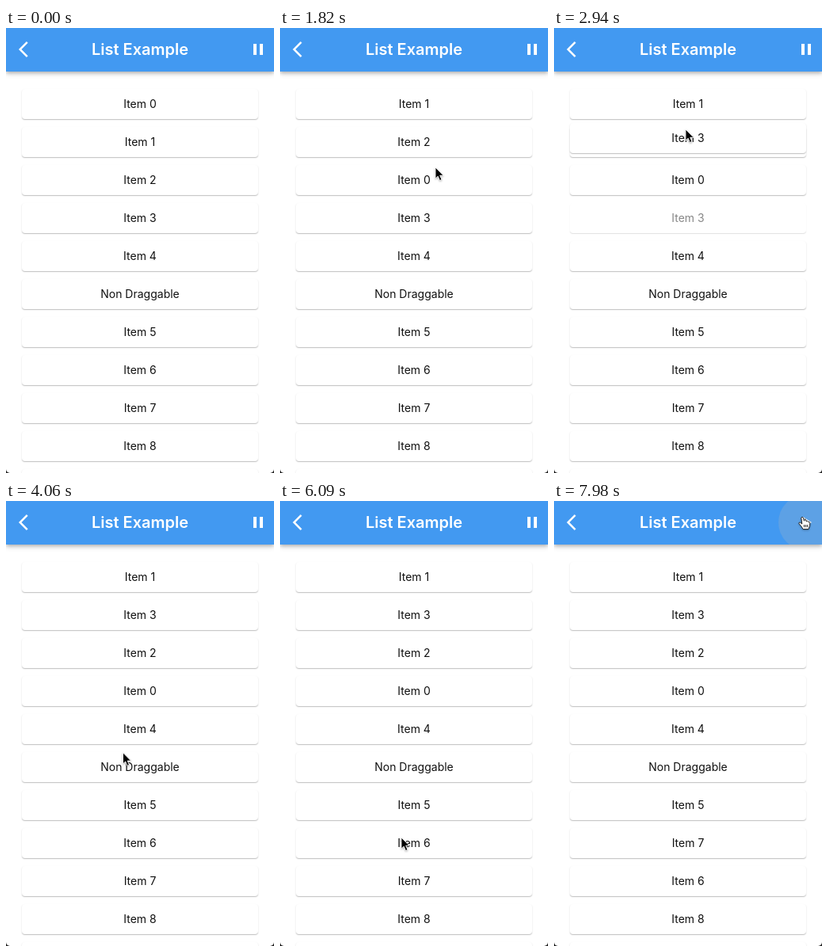
Write an HTML page that moves like this. It is 338 px wide and 562 px high and loops after 8000 ms.

```html
<!DOCTYPE html>
<html lang="en">
<head>
<meta charset="utf-8">
<title>List Example</title>
<style>
  html, body { margin: 0; width: 100%; height: 100%; overflow: hidden; background: #222; }
  #app {
    position: absolute; inset: 0; overflow: hidden; background: #fff;
    border-radius: 0 0 5px 5px; font-family: Inter, Roboto, sans-serif;
  }
  header {
    position: absolute; left: 0; right: 0; top: 0; height: 55px; overflow: hidden;
    background: #4299f1; color: #fff; text-align: center;
    font: 600 20px/54px Inter, Roboto, sans-serif;
  }
  .shade {
    position: absolute; left: 0; right: 0; top: 0; height: 55px;
    box-shadow: 0 2px 4px rgba(0,0,0,.2), 0 3px 7px rgba(0,0,0,.14);
  }
  header svg { position: absolute; top: 15px; width: 24px; height: 24px; fill: #fff; }
  #ripple {
    position: absolute; left: 283px; top: -8px; width: 70px; height: 70px;
    border-radius: 50%; background: rgba(188,188,188,.22);
  }
  .card {
    position: absolute; left: 20px; width: 298px; height: 38px; border-radius: 4px;
    background: #fff; color: #111; text-align: center; font-size: 14px; line-height: 38px;
    box-shadow: 0 1px 1px rgba(0,0,0,.17), 0 1px 2px rgba(0,0,0,.1);
  }
  #cursor { position: absolute; left: 0; top: 0; width: 30px; height: 30px; overflow: visible;
    filter: drop-shadow(0 1px 1px rgba(0,0,0,.3)); }
</style>
</head>
<body>
<div id="app">
  <div id="list"></div>
  <div class="card" id="lifted"></div>
  <div class="shade"></div>
  <header>
    <div id="ripple"></div>
    <svg style="left:16px" viewBox="0 0 24 24"><path d="M11.67 3.87 9.9 2.1 0 12l9.9 9.9 1.77-1.77L3.54 12z"/></svg>
    List Example
    <svg style="left:306px" viewBox="0 0 24 24"><path id="toggle"/></svg>
  </header>
  <svg id="cursor">
    <path id="arrow" d="M0 0V14.2L3.2 11.2 5.5 16.6 8 15.5 5.7 10.3H10.1Z" fill="#000" stroke="#fff" stroke-width=".9"/>
    <g id="hand" stroke="#222" stroke-width="1" stroke-linejoin="round" fill="#fff">
      <path d="M-1.2 1.2Q0-.8 1.3 1L2.5 5.2Q4-.0 5 5.6 6.8 4.3 7.6 6.4 9.4 5.6 9.8 7.8L9.6 11.4 8 15.6H1.2L-1.4 11.6-4 8.6Q-4.4 6.6-2.4 7.2L-.2 9Z"/>
      <path d="M2.6 10v3.2M4.7 10v3.2M6.8 10v3.2" fill="none"/>
    </g>
  </svg>
</div>
<script>
const LOOP = 8000, STEP = 70, TOP = 77, PITCH = 48;
const PAUSE = 'M6 19h4V5H6v14zm8-14v14h4V5h-4z', PLAY = 'M8 5v14l11-7z';
const $ = id => document.getElementById(id);

const smooth = u => u * u * (3 - 2 * u);
const out = u => 1 - (1 - u) ** 2;

// time, x, y, easing into the point (linear if absent)
const path = [
  [420, 206, 520], [490, 200, 478], [980, 180, 88, out],
  [1120, 180, 88], [1680, 196, 176, smooth],
  [1820, 196, 176], [2520, 168, 229, smooth],
  [2590, 168, 229], [2940, 166, 128, smooth],
  [3360, 166, 128], [4200, 146, 333, smooth],
  [4340, 146, 333], [4760, 150, 405, smooth], [5110, 119, 333, smooth], [5180, 97, 332],
  [5250, 97, 332], [5600, 130, 407, smooth],
  [5670, 130, 407], [6090, 153, 425], [6370, 164, 428, out],
  [6440, 164, 428], [6720, 163, 460, smooth],
  [7070, 163, 460], [7140, 171, 350], [7210, 220, 200], [7280, 269, 107],
  [7420, 269, 107], [7770, 313, 20, smooth]
];

const drags = [
  { from: 0, to: 2, start: 1190, end: 1680, grab: 88 },
  { from: 3, to: 1, start: 2660, end: 3080, grab: 229 },
  { from: 7, to: 8, start: 6510, end: 6720, grab: 428 }
];

const labels = [0, 1, 2, 3, 4, 5, 6, 7, 8, 9].map(n => 'Item ' + n);
labels.splice(5, 0, 'Non Draggable');
const cards = labels.map(text => {
  const el = document.createElement('div');
  el.className = 'card';
  el.textContent = text;
  return $('list').appendChild(el);
});

function pointAt(t) {
  const i = path.findIndex(p => p[0] > t);
  if (i < 0) return path[path.length - 1].slice(1, 3);
  if (i === 0) return path[0].slice(1, 3);
  const a = path[i - 1], b = path[i];
  let u = (t - a[0]) / (b[0] - a[0]);
  if (b[3]) u = b[3](u);
  return [a[1] + (b[1] - a[1]) * u, a[2] + (b[2] - a[2]) * u];
}

function show(el, on) { el.style.display = on ? '' : 'none'; }

function draw(t) {
  const [x, y] = pointAt(t);
  const order = labels.map((_, i) => i);
  for (const d of drags)
    if (t >= d.end) order.splice(d.to, 0, order.splice(d.from, 1)[0]);
  const drag = drags.find(d => t >= d.start && t < d.end);

  order.forEach((id, slot) => {
    cards[id].style.top = TOP + slot * PITCH + 'px';
    cards[id].style.opacity = drag && drag.from === slot ? .5 : 1;
  });
  show($('lifted'), drag);
  if (drag) {
    $('lifted').textContent = labels[order[drag.from]];
    $('lifted').style.top = TOP + drag.from * PITCH + y - drag.grab + 'px';
  }

  const overButton = x > 294 && y < 55;
  show($('cursor'), t >= 490);
  show($('arrow'), !overButton);
  show($('hand'), overButton);
  $('cursor').style.transform = `translate(${x}px, ${y}px)`;
  $('ripple').style.opacity = Math.min(1, Math.max(0, (t - 7770) / 140));
  $('toggle').setAttribute('d', t >= 7910 ? PLAY : PAUSE);
}

const begin = performance.now();
function tick() {
  const t = (performance.now() - begin) % LOOP;
  draw(Math.floor(t / STEP) * STEP);
  requestAnimationFrame(tick);
}
tick();
</script>
</body>
</html>
```
